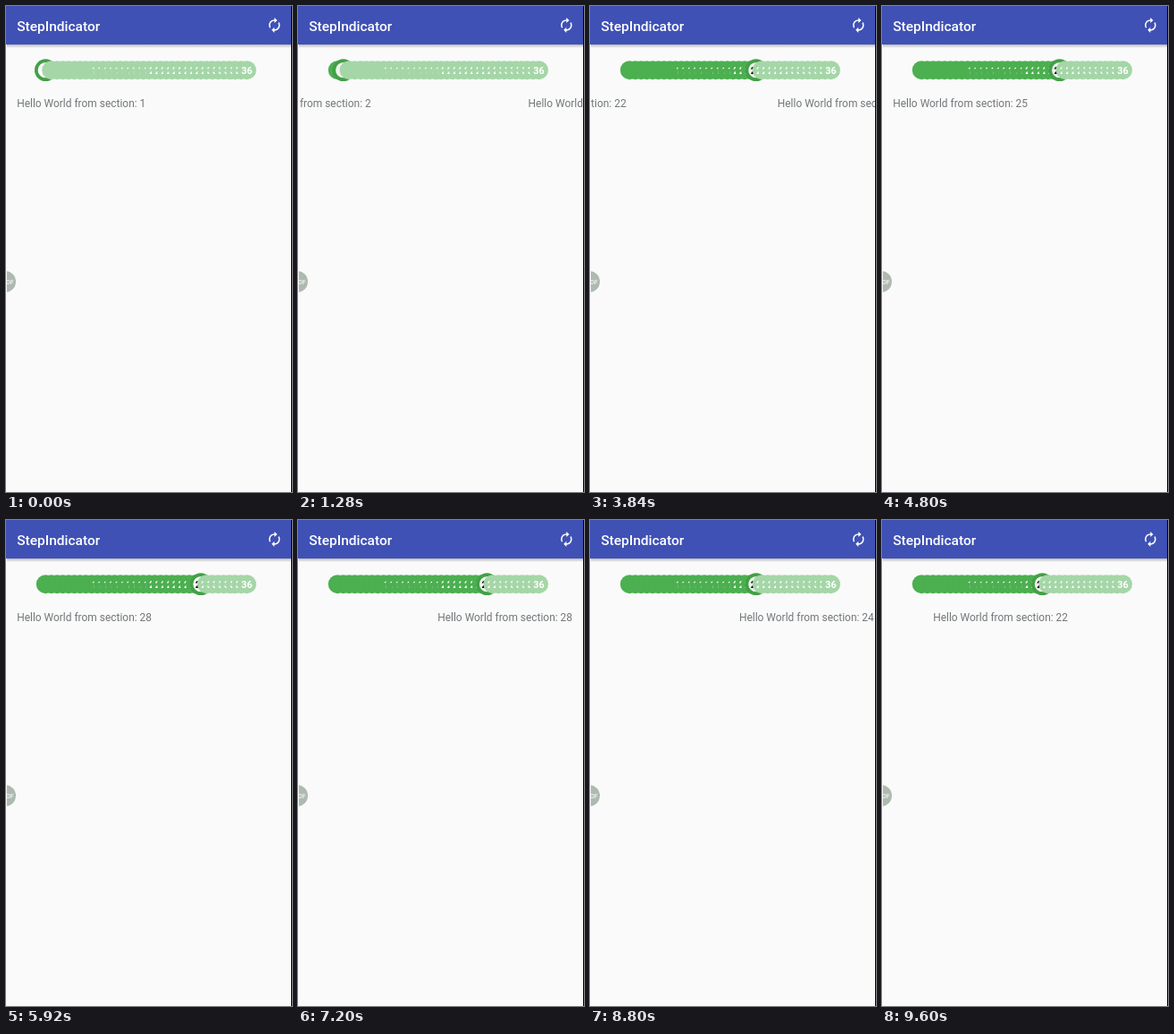
Recreate the animation shown at these times as an HTML page. Size 320 px wide and 543 px high, loop 9.76 s.

```html
<!DOCTYPE html>
<html lang="en">
<head>
<meta charset="utf-8">
<title>StepIndicator</title>
<style>
  html, body { margin: 0; width: 100%; height: 100%; overflow: hidden; background: #fafafa; }
  svg { display: block; width: 320px; height: 543px; font-family: Roboto, sans-serif; }
  .title { font-size: 15.5px; font-weight: 500; fill: #fff; }
  .page { font-size: 11.95px; fill: #72777a; white-space: pre; }
  .num { font-size: 10.8px; font-weight: 700; text-anchor: middle; }
  .badge { font-size: 7px; font-weight: 500; fill: #f4f6f4; }
</style>
</head>
<body>
<svg id="stage" viewBox="0 0 320 543">
  <defs>
    <linearGradient id="shade" x2="0" y2="1">
      <stop offset="0" stop-color="#000" stop-opacity=".26"/>
      <stop offset="1" stop-color="#000" stop-opacity="0"/>
    </linearGradient>
  </defs>
  <rect width="320" height="543" fill="#fafafa"/>
  <rect y="43" width="320" height="4" fill="url(#shade)"/>
  <rect width="320" height="43" fill="#3f51b5"/>
  <text class="title" x="12.2" y="27.5">StepIndicator</text>
  <path fill="#fff" transform="translate(291 12.1) scale(.7776)"
    d="M12 6v3l4-4-4-4v3c-4.42 0-8 3.58-8 8 0 1.57.46 3.03 1.24 4.26L6.7 14.8c-.45-.83-.7-1.79-.7-2.8 0-3.31 2.69-6 6-6zm6.76 1.74L17.3 9.2c.44.84.7 1.79.7 2.8 0 3.31-2.69 6-6 6v-3l-4 4 4 4v-3c4.42 0 8-3.58 8-8 0-1.57-.46-3.03-1.24-4.26z"/>
  <g id="steps"></g>
  <g id="pages"></g>
  <circle cx="-1" cy="308" r="12" fill="#aeb9b0"/>
  <text class="badge" x="0" y="310.6">OF</text>
  <rect y="43" width="1" height="500" fill="#fafafa"/>
  <rect x="319" width="1" height="543" fill="#000"/>
</svg>
<script>
const LOOP = 9760, TICK = 160;
const COUNT = 36, FIRST_X = 44.3, GAP = 6.434, MID_Y = 71.7, RADIUS = 10.5;
const DONE = '#4caf50', RING = '#43a047', NEXT = '#a5d6a7';
const SWITCH_AT = 0.36; // part of a swipe after which the next page is selected

// [time, page]; every page between two keys is one swipe
const keys = [
  [0, 1], [760, 1], [1162, 2], [1915, 4], [2240, 4],
  [2240, 32], [2720, 32], [2720, 21], [3300, 21],
  [4060, 23], [5915, 28], [7060, 28], [7660, 26], [9492, 22], [9950, 21]
];
const BLANK = [2240, 3040]; // pages not filled yet after a long jump

const el = (parent, name, attrs) => {
  const node = document.createElementNS('http://www.w3.org/2000/svg', name);
  for (const k in attrs) node.setAttribute(k, attrs[k]);
  return parent.appendChild(node);
};
const byId = id => document.getElementById(id);

const steps = Array.from({ length: COUNT }, (_, i) => {
  const x = FIRST_X + i * GAP;
  const dot = el(byId('steps'), 'circle', { cx: x, cy: MID_Y, r: RADIUS });
  const num = el(byId('steps'), 'text', { class: 'num', x, y: MID_Y + 3.9 });
  num.textContent = i + 1;
  return { dot, num };
});
const pages = [0, 1].map(() => el(byId('pages'), 'text', { class: 'page', y: 113 }));

const smooth = f => f * f * (3 - 2 * f);

function stateAt(t) {
  let i = keys.length - 2;
  while (keys[i][0] > t) i--;
  const [t0, a] = keys[i], [t1, b] = keys[i + 1];
  if (a === b) return { pos: a, selected: a };
  const dir = Math.sign(b - a);
  const swipes = (t - t0) / (t1 - t0) * Math.abs(b - a);
  const whole = Math.floor(swipes);
  const part = smooth(swipes - whole);
  return {
    pos: a + dir * (whole + part),
    selected: a + dir * (whole + (part > SWITCH_AT ? 1 : 0))
  };
}

function drawSteps({ pos, selected }) {
  steps.forEach(({ dot, num }, i) => {
    const side = Math.sign(i + 1 - selected);
    const moving = pos !== selected;
    dot.setAttribute('fill', side < 0 ? DONE : side > 0 ? NEXT : moving ? '#eef1ec' : '#fafafa');
    dot.setAttribute('stroke', side ? 'none' : RING);
    dot.setAttribute('stroke-width', 3.7);
    num.setAttribute('fill', side ? '#fff' : '#000');
  });
}

function drawPages({ pos }, hidden) {
  pages.forEach((page, i) => {
    const n = Math.floor(pos) + i;
    page.textContent = hidden ? '' : 'Hello World from section: ' + n;
    page.setAttribute('x', 12.2 + (n - pos) * 320);
  });
}

function render(ms) {
  const t = Math.floor(ms % LOOP / TICK) * TICK;
  const state = stateAt(t);
  drawSteps(state);
  drawPages(state, t >= BLANK[0] && t < BLANK[1]);
}

const start = performance.now();
function frame() {
  render(performance.now() - start);
  requestAnimationFrame(frame);
}
frame();
</script>
</body>
</html>
```
